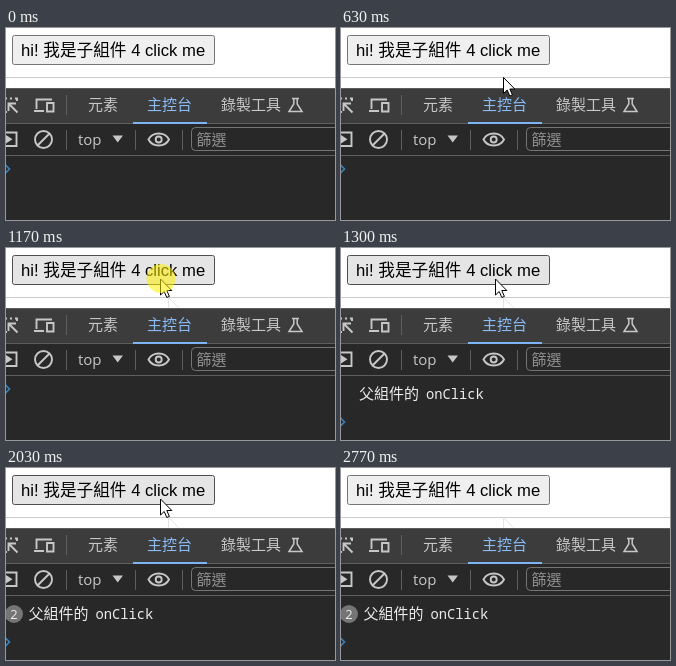
An HTML page that plays this animation: 329x192 px, repeating every 3.45 s.

```html
<!DOCTYPE html>
<html lang="zh-Hant">
<head>
<meta charset="utf-8">
<style>
html, body { margin: 0; height: 100%; overflow: hidden; background: #fff; }
svg { display: block; width: 329px; height: 192px; }
text { font: 350 15px "Open Sans", "Noto Sans CJK TC", "Noto Sans CJK", sans-serif; fill: #c7c7c7; }
.label { font: 350 16.67px "Liberation Sans", "Noto Sans CJK TC", "Noto Sans CJK", sans-serif; fill: #000; }
.log text { font-weight: 400; fill: #ececec; }
.log .mono { font: 500 13.75px "Noto Sans Mono", monospace; }
.icon { fill: none; stroke: #c7c7c7; stroke-width: 1.9; }
.solid { fill: #c7c7c7; }
.rule { fill: #5e5e5e; }
</style>
</head>
<body>
<svg viewBox="0 0 329 192">
  <defs><path id="arrow" d="M.5 .5V16.5L4.2 13L6.8 19L9.4 17.9L6.8 12H11.8Z"/></defs>

  <rect width="329" height="192" fill="#fff"/>
  <rect id="button" x="6.5" y="7.5" width="202" height="29" rx="2"/>
  <text class="label" x="15" y="28">hi! 我是子組件 4 click me</text>
  <rect y="49" width="329" height="1" fill="#cbcbcb"/>

  <rect y="60" width="329" height="132" fill="#282828"/>
  <rect y="60" width="329" height="35" fill="#3c3c3c"/>
  <path class="rule" d="M0 60h329v1H0zM0 95h329v1H0zM0 127h329v1H0z"/>
  <rect x="127" y="94" width="74" height="2" fill="#7cb4f4"/>

  <g class="icon">
    <path d="M0 70.5H1M4 70.5H6M9 70.5H11V73M0 84H1M11.500 84.500L3 76M2.500 83V75.500H10"/>
    <path d="M30.5 81V71.5H46M28 83H38M41 75H47.500V83.500H41Z"/>
    <path d="M286 70.5H293M287.8 71V76L283 83.5H296L291.2 76V71" stroke-width="1.5"/>
    <path d="M0 104.5H10.5V118H0"/>
    <circle cx="37.5" cy="111.5" r="8.5"/>
    <path d="M31.5 117.5L43.5 105.5"/>
    <path d="M142.500 111.500C146.500 103.500 159 103.500 163 111.500C159 119.500 146.500 119.500 142.500 111.500Z"/>
    <circle cx="152.700" cy="111.500" r="3"/>
  </g>
  <path class="solid" d="M0 107L6.500 111.300L0 115.500ZM106.500 107.500H117L111.700 114.500Z"/>
  <path class="rule" d="M60 67h1v20h-1zM60 102h1v20h-1zM129 102h1v20h-1zM176 102h1v20h-1z"/>

  <text x="82" y="82">元素</text>
  <text x="141" y="82" style="fill:#8abbf5">主控台</text>
  <text x="215" y="82">錄製工具</text>
  <text x="72" y="116.500" style="font-weight:400">top</text>
  <rect x="185.500" y="99.500" width="160" height="23" rx="4" fill="#282828" stroke="#757575"/>
  <text x="190.500" y="117" style="fill:#8f8f8f">篩選</text>

  <g id="log" class="log">
    <g id="message">
      <text x="18" y="151">父組件的</text>
      <text class="mono" x="85" y="151">onClick</text>
    </g>
    <g id="badge">
      <circle cx="8" cy="146" r="9" fill="#757575"/>
      <text x="8" y="150.500" text-anchor="middle" style="font-size:13px">2</text>
    </g>
  </g>
  <path id="prompt" d="M-1 136.500L3.500 141L-1 145.500" fill="none" stroke="#3a80b5" stroke-width="1.6"/>

  <use id="trace" href="#arrow" x="162" y="49" fill="#fff" stroke="#e4e4e4" clip-path="inset(0 0 9px 0)"/>
  <use id="cursor" href="#arrow" fill="#fff" stroke="#000"/>
  <circle id="halo" cx="155" cy="30.500" r="14.500" fill="#fff000" opacity=".55"/>
</svg>
<script>
const LOOP = 3450, STEP = 70;
const $ = id => document.getElementById(id);
const show = (id, on) => $(id).setAttribute("visibility", on ? "inherit" : "hidden");
const move = (id, x, y) => $(id).setAttribute("transform", `translate(${x} ${y})`);
const within = (t, from, to) => t >= from && t < to;
const looks = {
  idle: ["#efefef", "#767676"],
  hover: ["#e5e5e5", "#4f4f4f"],
  active: ["#f5f5f5", "#8d8d8d"]
};

// The pointer is sampled every 70 ms while it moves.
function pointer(t) {
  if (t < 770) {
    const left = 1 - Math.floor((t - 210) / STEP) / 7;
    return [Math.round(154 + 137 * left ** 1.45), Math.round(34 + 146 * left ** 1.17)];
  }
  if (t < 2560) return [154, 30.5];
  const p = ((Math.floor((t - 2560) / STEP) + 1) / 3) ** 1.5;
  return [Math.round(154 + 53 * p), Math.round(31 + 121 * p)];
}

function draw(t) {
  const pressed = within(t, 1230, 1300) || within(t, 1900, 1970);
  const look = pressed ? "active" : within(t, 700, 2560) ? "hover" : "idle";
  $("button").setAttribute("fill", looks[look][0]);
  $("button").setAttribute("stroke", looks[look][1]);

  const logged = t >= 1300, twice = t >= 2030;
  show("log", logged);
  show("badge", logged && twice);
  move("message", twice ? 4.5 : 0, 0);
  move("prompt", 0, logged ? 33 : 0);

  show("trace", t >= 700);
  show("halo", within(t, 1170, 1300) || within(t, 1900, 1970));
  show("cursor", within(t, 210, 2770));
  move("cursor", ...pointer(Math.max(t, 210)));
}

const start = performance.now();
function frame() {
  draw((performance.now() - start) % LOOP);
  requestAnimationFrame(frame);
}
draw(0);
requestAnimationFrame(frame);
</script>
</body>
</html>
```
